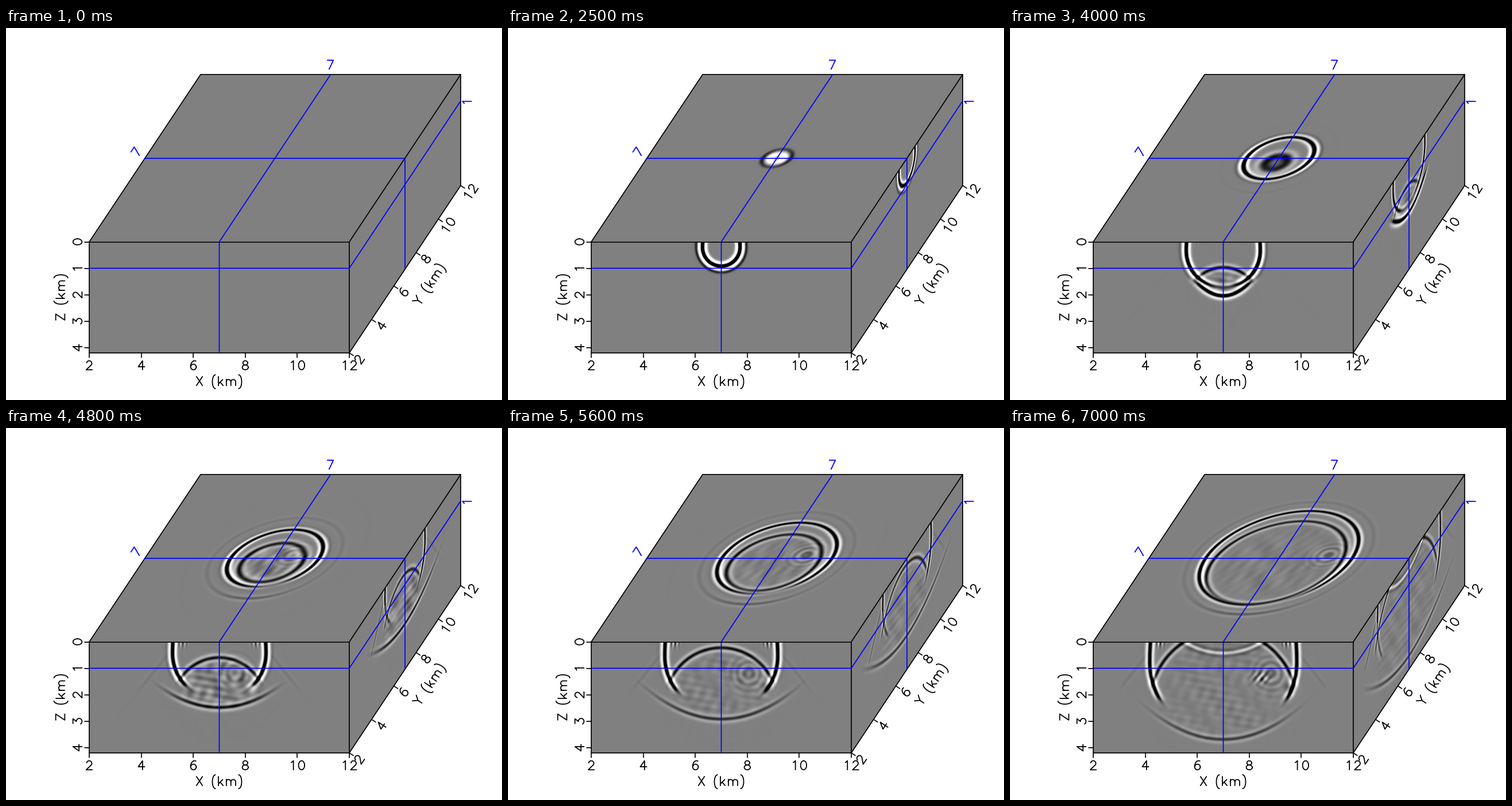
A matplotlib script for the animation above (7100 ms loop, 864 px wide and 648 px high).

```python
import numpy as np
import matplotlib.pyplot as plt
from matplotlib.animation import FuncAnimation

W, H, DPI = 864, 648, 100
LEFT, RIGHT, TOP, BOTTOM = 145, 598, 372.5, 566
SHIFT_X, SHIFT_Y = 194, -291.5
SPAN = RIGHT - LEFT
Z_SLICE = 46
BLUE = "#0000ff"
EDGE_ANGLE = np.degrees(np.arctan2(-SHIFT_Y, SHIFT_X))

fig = plt.figure(figsize=(W / DPI, H / DPI), dpi=DPI, facecolor="white")
ax = fig.add_axes([0, 0, 1, 1])
ax.set_xlim(0, W)
ax.set_ylim(H, 0)
ax.axis("off")


# ---- stroke lettering -------------------------------------------------
def arc(cx, cy, rx, ry, start=0, stop=360):
    t = np.radians(np.linspace(start, stop, 25))
    return list(zip(cx + rx * np.cos(t), cy + ry * np.sin(t)))


# glyph: (advance, strokes), cap height 21
GLYPHS = {
    " ": (16, []),
    "0": (20, [arc(10, 10.5, 7, 10.5)]),
    "1": (20, [[(6, 17), (8, 18), (11, 21), (11, 0)]]),
    "2": (20, [arc(10, 15, 6, 6, 170, -35) + [(3, 0), (17, 0)]]),
    "3": (20, [[(5, 21), (16, 21)] + arc(10, 6.5, 7, 6.5, 90, -150)]),
    "4": (20, [[(13, 0), (13, 21), (3, 7), (18, 7)]]),
    "6": (20, [arc(10.5, 6.5, 6.5, 6.5), arc(13, 8, 9, 13, 185, 70)]),
    "7": (20, [[(3, 21), (17, 21), (7, 0)]]),
    "8": (20, [arc(10, 16, 5.5, 5), arc(10, 5.6, 7, 5.6)]),
    "X": (20, [[(3, 21), (17, 0)], [(17, 21), (3, 0)]]),
    "Y": (18, [[(1, 21), (9, 11), (9, 0)], [(17, 21), (9, 11)]]),
    "Z": (20, [[(3, 21), (17, 21), (3, 0), (17, 0)]]),
    "(": (14, [arc(11, 9, 7, 16, 90, 270)]),
    ")": (14, [arc(3, 9, 7, 16, 90, -90)]),
    "k": (18, [[(4, 21), (4, 0)], [(14, 14), (4, 4)], [(8, 8), (15, 0)]]),
    "m": (30, [[(4, 14), (4, 0)],
               arc(9.5, 9, 5.5, 5, 180, 0) + [(15, 0)],
               arc(20.5, 9, 5.5, 5, 180, 0) + [(26, 0)]]),
}


def line(points, color="black", width=1.7):
    xs, ys = zip(*points)
    ax.plot(xs, ys, color=color, lw=width * 72 / DPI,
            solid_capstyle="round", solid_joinstyle="round")


def label(text, x, y, angle=0, color="black", scale=0.75):
    pen = -sum(GLYPHS[ch][0] for ch in text) / 2
    c, s = np.cos(np.radians(angle)), np.sin(np.radians(angle))
    for ch in text:
        advance, strokes = GLYPHS[ch]
        for stroke in strokes:
            p = (np.array(stroke) + (pen, -10.5)) * scale
            line(list(zip(x + p[:, 0] * c - p[:, 1] * s,
                          y - p[:, 0] * s - p[:, 1] * c)), color, 1.8)
        pen += advance


# ---- pixel positions on the three visible slices ----------------------
ys, xs = np.mgrid[:H, :W] + 0.5
depth = (TOP - ys) / -SHIFT_Y
across = (xs - RIGHT) / SHIFT_X
a_top = xs - LEFT - SHIFT_X * depth - SPAN / 2
z_side = ys - TOP - SHIFT_Y * across

front = (xs > LEFT) & (xs < RIGHT) & (ys > TOP) & (ys < BOTTOM)
top = (depth > 0) & (depth < 1) & (abs(a_top) < SPAN / 2)
side = (across > 0) & (across < 1) & (z_side > 0) & (z_side < BOTTOM - TOP)

# a, b: horizontal distances from the shot; z: depth
cube_a = np.where(top, a_top, np.where(front, xs - LEFT - SPAN / 2, 0))
cube_b = np.where(top, (depth - 0.5) * SPAN,
                  np.where(side, (across - 0.5) * SPAN, 0))
cube_z = np.where(top, Z_SLICE, np.where(side, z_side, ys - TOP))

base = np.full((H, W, 3), 255, np.uint8)
base[front | top | side] = 128
active = (front | top | side) & (np.hypot(cube_a, cube_b) < 180)
A, B, Z = (v[active].astype(np.float32) for v in (cube_a, cube_b, cube_z))
RHO = np.hypot(A, B)
THETA = np.arctan2(B, A)
Q = np.hypot(A, 0.75 * B)
GAP = np.exp(-((THETA + 1.2) / 0.5) ** 2) * (Z > 30)
FRONTAL = 0.55 + 0.45 * (A / (RHO + 1)) ** 2

rng = np.random.default_rng(4)
RIPPLES = [(rng.normal(size=3) * (0.16, 0.16, 0.3), rng.uniform(0, 6.3))
           for _ in range(6)]


def ricker(u):
    s = 0.05 * u * u
    return (2 * s - 1) * np.exp(-s)


def sigmoid(x):
    return 1 / (1 + np.exp(-np.clip(x, -30, 30)))


def ramp(n, start, stop):
    return float(np.clip((n - start) / (stop - start), 0, 1))


def wavefield(n):
    radius = 47.5 + 2.12 * (n - 31)
    centre = 6 + n * n / 160

    # direct wave, sinking and flattened near the surface
    dz = Z - centre
    dz = np.where(dz < 0, 0.5 * dz, dz)
    u = np.sqrt(RHO ** 2 + dz ** 2) - radius
    gain = (1.3 + 75 / max(radius, 25)) * FRONTAL
    reach = sigmoid((74 + 1.1 * max(0, n - 47) - Z) / 4)
    direct = ricker(u) - 0.8 * np.exp(-n / 20 - ((u - 11) / 2.5) ** 2)
    v = gain * reach * direct * (1 - 0.9 * GAP * ramp(n, 38, 44))
    if n < 31:
        return v

    # stripes trailing the direct wave at the surface
    v += (0.9 * ramp(n, 38, 50) * FRONTAL * np.cos(2 * np.pi * u / 7)
          * np.exp(-((u + 16) / 8) ** 2 - (Z / 8) ** 2))

    # reflection from the fast body, and its bounce off the surface
    dr = np.sqrt(A ** 2 + (B + 12) ** 2 + (Z - 108) ** 2) - radius
    v += (0.95 * ramp(n, 33, 38) * ricker(dr) * (0.5 + 0.5 * FRONTAL)
          * sigmoid(((centre + 108) / 2 + 2 - Z) / 3))
    if radius > 95:
        bounce = np.sqrt(A ** 2 + (B + 12) ** 2 + (Z + 108) ** 2) - radius
        v -= 0.6 * ricker(bounce)

    # transmitted wave
    bottom = 94 + (n - 39) * (2.53 if n >= 39 else 4.2)
    bend = np.clip(45 + 13 * (n - 39), 45, 160)
    spread = np.clip(60 + 3 * (n - 39), 40, 108)
    lower = bottom - Q ** 2 / (2 * bend)
    fade = np.exp(-(Q / spread) ** 4)
    ut = (Z - lower) / np.sqrt(1 + (Q / bend) ** 2)
    v += (min(2, 0.55 + 1.5 * np.exp(-(n - 39) / 6)) * ramp(n, 31, 36)
          * ricker(ut) * fade * sigmoid((Z - 66) / 3))

    # faint leading refraction
    uh = RHO - 109 - 1.95 * (n - 47) + 0.8 * (Z_SLICE - Z)
    v += (ramp(n, 38, 46) * ricker(0.8 * uh) * sigmoid((80 - Z) / 5)
          * sigmoid((Z - 20) / 4)
          * (0.06 + 0.22 * np.exp(-((THETA + 1.57) / 0.5) ** 2)))

    # reverberation inside the body
    inside = sigmoid((-8 - dr) / 5) * sigmoid((lower - 6 - Z) / 5) * fade
    ripple = sum(np.cos(k[0] * A + k[1] * B + k[2] * Z + phase - 0.15 * n)
                 for k, phase in RIPPLES)
    v += (ramp(n, 35, 40) * inside * ripple
          * (0.025 + 0.09 * np.exp(-((n - 42) / 8) ** 2)))

    # scattering on the right
    d = np.sqrt((A - 48 - 2.5 * (n - 55)) ** 2 + (B - 8) ** 2 + (Z - 55) ** 2)
    v += (0.3 * ramp(n, 42, 48) * np.cos(2 * np.pi * d / 11 - 0.4 * n)
          * np.exp(-(d / 26) ** 2))
    d2 = (A - 57 - 2.65 * (n - 47)) ** 2 + B ** 2 + (Z - 80) ** 2
    s = d2 / 110
    v += (0.7 * ramp(n, 42, 46) * np.clip((51 - n) / 4, -1, 1)
          * (1 - 0.8 * s) * np.exp(-s))
    d2 = ((A - 66) / 14) ** 2 + (B / 14) ** 2 + ((Z - 62) / 9) ** 2
    v += 0.8 * ramp(n, 60, 67) * np.cos(0.5 * A + 0.4 * Z) * np.exp(-d2)
    return v


# ---- cube outline, section lines, axes --------------------------------
image = ax.imshow(base, extent=(0, W, H, 0), interpolation="nearest",
                  aspect="auto")
ax.set_xlim(0, W)
ax.set_ylim(H, 0)


def back(x, y, part=1):
    return x + SHIFT_X * part, y + SHIFT_Y * part


line([(LEFT, TOP), (RIGHT, TOP), (RIGHT, BOTTOM), (LEFT, BOTTOM), (LEFT, TOP)])
line([(LEFT, TOP), back(LEFT, TOP), back(RIGHT, TOP), back(RIGHT, BOTTOM),
      (RIGHT, BOTTOM)])
line([(RIGHT, TOP), back(RIGHT, TOP)])

mid = (LEFT + RIGHT) / 2
z_line = TOP + Z_SLICE
line([(mid, BOTTOM), (mid, TOP), back(mid, TOP)], BLUE)
line([(LEFT, z_line), (RIGHT, z_line), back(RIGHT, z_line)], BLUE)
line([back(LEFT, TOP, 0.5), back(RIGHT, TOP, 0.5), back(RIGHT, BOTTOM, 0.5)],
     BLUE)
label("7", 565, 64, 0, BLUE)
label("7", 227, 216, EDGE_ANGLE, BLUE)
label("1", 803, 128.5, 90, BLUE)

for i in range(6):
    name = str(2 + 2 * i)
    x = LEFT + SPAN * i / 5
    line([(x, BOTTOM), (x, BOTTOM + 8)])
    label(name, x, 587.5)
    x, y = back(RIGHT, BOTTOM, i / 5)
    line([(x, y), (x + 7, y + 4.5)])
    label(name, x + 17, y + 11, EDGE_ANGLE)
for i in range(5):
    y = TOP + 46.2 * i
    line([(LEFT, y), (LEFT - 8, y)])
    label(str(i), 124.5, y, 90)
label("X (km)", 371.5, 615)
label("Y (km)", 737, 446, EDGE_ANGLE)
label("Z (km)", 94.5, 469, 90)


def update(tick):
    # the still opening holds for two ticks
    n = max(0, tick - 1)
    picture = base.copy()
    if n:
        shade = 128 + 127 * np.clip(wavefield(n), -1, 1)
        picture[active] = shade.astype(np.uint8)[:, None]
    image.set_data(picture)
    return [image]


anim = FuncAnimation(fig, update, frames=71, interval=100, repeat=True,
                     repeat_delay=0, blit=False)
plt.show()
```
